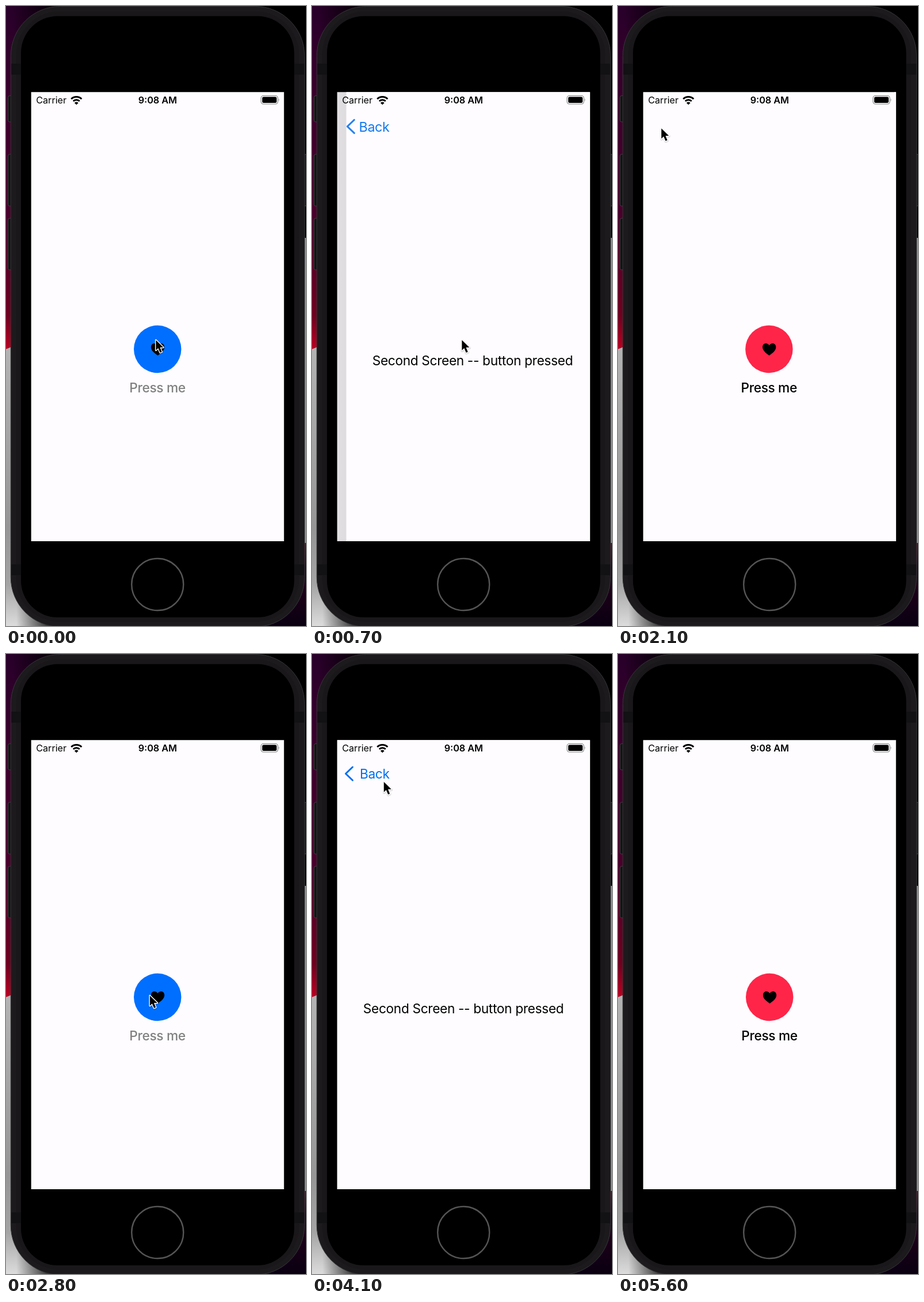
An HTML page that plays this animation: 521x1075 px, repeating every 5700 ms.

```html
<!DOCTYPE html>
<html lang="en">
<head>
<meta charset="utf-8">
<title>Push navigation</title>
<style>
html, body { margin: 0; width: 100%; height: 100%; overflow: hidden; background: #000; }
svg { display: block; width: 100vw; height: 100vh; }
text { font-family: Inter, "Liberation Sans", sans-serif; font-size: 22.7px; letter-spacing: -.34px; }
.status { font-size: 16.2px; letter-spacing: 0; }
</style>
</head>
<body>
<svg viewBox="0 0 521 1075" preserveAspectRatio="none">
  <defs>
    <linearGradient id="wallLeft" x1="0" y1="0" x2="0" y2="1">
      <stop offset="0" stop-color="#28002a"/>
      <stop offset=".3" stop-color="#3c002c"/>
      <stop offset=".65" stop-color="#4c002c"/>
      <stop offset=".9" stop-color="#70001f"/>
      <stop offset="1" stop-color="#c00020"/>
    </linearGradient>
    <linearGradient id="fade">
      <stop offset="0" stop-color="#000" stop-opacity="0"/>
      <stop offset="1" stop-color="#000"/>
    </linearGradient>
    <linearGradient id="grey" x1="0" y1="0" x2="0" y2="1">
      <stop offset="0" stop-color="#b4b4b4"/>
      <stop offset=".65" stop-color="#969696"/>
      <stop offset=".85" stop-color="#a4a4a4"/>
      <stop offset="1" stop-color="#dcdcdc"/>
    </linearGradient>
    <linearGradient id="wallRight" x1="0" y1="0" x2="0" y2="1">
      <stop offset="0" stop-color="#7a0022"/>
      <stop offset=".3" stop-color="#26001c"/>
      <stop offset="1" stop-color="#0a0012"/>
    </linearGradient>
    <linearGradient id="edge">
      <stop offset="0" stop-color="#000" stop-opacity=".005"/>
      <stop offset="1" stop-color="#000" stop-opacity=".022"/>
    </linearGradient>
    <clipPath id="view"><rect x="43.700" y="149.300" width="439" height="778.700"/></clipPath>
  </defs>

  <!-- wallpaper -->
  <rect width="521" height="1075"/>
  <rect width="90" height="598" fill="url(#wallLeft)"/>
  <rect x="10" width="80" height="150" fill="url(#fade)"/>
  <path d="M0 595L12 590H90V1075H0Z" fill="url(#grey)"/>
  <rect x="18" y="960" width="72" height="115" fill="url(#fade)"/>
  <rect x="510" y="402" width="11" height="530" fill="#8e8e8e"/>
  <rect x="430" y="931" width="91" height="144" fill="url(#wallRight)"/>

  <!-- phone -->
  <g fill="#141315" stroke="#414042">
    <rect x="3.500" y="155.500" width="10" height="45.500" rx="3"/>
    <rect x="3.500" y="257" width="10" height="90" rx="3"/>
    <rect x="3.500" y="368" width="10" height="89.500" rx="3"/>
    <rect x="511" y="257" width="11" height="90" rx="3"/>
  </g>
  <rect x="8.300" y=".5" width="510.200" height="1076" rx="86" fill="#1c1a1d" stroke="#363538"/>
  <rect x="17.500" y="9" width="491.500" height="1059" rx="76" fill="#19171a"/>
  <g fill="#121114">
    <rect x="9" y="100" width="17" height="19"/><rect x="500" y="100" width="18" height="19"/>
    <rect x="9" y="968" width="17" height="19"/><rect x="500" y="968" width="18" height="19"/>
  </g>
  <rect x="26" y="17.500" width="474.500" height="1042.500" rx="64"/>
  <circle cx="263.200" cy="1003" r="45" fill="none" stroke="#555" stroke-width="2.400"/>

  <!-- app -->
  <g clip-path="url(#view)">
    <rect x="43" y="149" width="440" height="780" fill="#fefcff"/>
    <g id="first">
      <circle id="disc" cx="263.200" cy="595" r="41.200"/>
      <path d="M263.500 606C257 601.500 251.800 597 251.800 591.500C251.800 587.700 254.400 585 257.700 585C260.200 585 262.300 586.300 263.500 588.500C264.700 586.300 266.800 585 269.300 585C272.600 585 275.200 587.700 275.200 591.500C275.200 597 270 601.500 263.500 606Z"/>
      <text id="label" x="263" y="670" text-anchor="middle" font-weight="500">Press me</text>
    </g>
    <rect id="dim" x="43" y="149" width="440" height="780"/>
    <g id="second">
      <rect id="shade" x="30" y="149" width="14" height="780" fill="url(#edge)"/>
      <rect x="43.700" y="149" width="440" height="780" fill="#fefcff"/>
      <text x="263" y="623" text-anchor="middle">Second Screen -- button pressed</text>
    </g>
    <path id="chevron" d="M70.500 196L58.500 207.500L70.500 219" fill="none" stroke="#0070f0" stroke-width="3" stroke-linecap="round" stroke-linejoin="round"/>
    <text id="back" fill="#0070f0">Back</text>

    <text class="status" x="52.200" y="169">Carrier</text>
    <text class="status" x="263.300" y="169" text-anchor="middle" font-weight="600">9:08 AM</text>
    <g fill="none" stroke="#000" stroke-width="3">
      <path d="M113.300 161.300A12.800 12.800 0 0 1 131.300 161.300"/>
      <path d="M116.800 165A8 8 0 0 1 127.800 165"/>
    </g>
    <path d="M122.300 171.300L118.900 167.900A4.800 4.800 0 0 1 125.700 167.900Z"/>
    <rect x="443" y="155.500" width="29" height="14.500" rx="4" fill="none" stroke="#808080" stroke-width="1.200"/>
    <rect x="445" y="157.500" width="25" height="10.500" rx="2.300"/>
    <path d="M473.600 160.500Q475.500 162.700 473.600 165Z" fill="#888"/>
  </g>

  <g id="cursor" stroke-linejoin="round">
    <path d="M1.300 2.800V20.500L5.300 16.800L8.600 24.500L11.700 23.200L8.500 15.600H14.300Z" stroke="#000" stroke-opacity=".12" stroke-width="4.500" transform="translate(.3 1)" fill="none"/>
    <path d="M1.300 2.800V20.500L5.300 16.800L8.600 24.500L11.700 23.200L8.500 15.600H14.300Z" stroke="#fff" stroke-width="2.800" paint-order="stroke"/>
  </g>
</svg>
<script>
const LOOP = 5700, WIDTH = 439, RATE = 0.013;
const $ = id => document.getElementById(id);
const set = (id, name, value) => $(id).setAttribute(name, value);
const move = (id, x, y, s = 1) => set(id, "transform", `translate(${x} ${y}) scale(${s})`);

// Start time and direction of each screen change
const turns = [[306, 1], [1550, 0], [3196, 1], [4350, 0]];
// Time and tip position of the pointer
const path = [
  [0, 259, 576.5], [950, 259, 576.5], [1380, 74, 209.5], [2150, 74, 209.5],
  [2740, 248.5, 589.5], [3750, 248.5, 589.5], [4100, 123.5, 219],
  [4280, 108, 212], [4420, 108, 212], [4900, 15, 50], [5050, -20, 44]
];

// Critically damped spring that comes to rest after 0.62 s
function spring(ms) {
  if (ms <= 0) return 0;
  if (ms > 620) return 1;
  const x = RATE * ms;
  return 1 - (1 + x) * Math.exp(-x);
}

function shown(t) {
  const turn = turns.filter(([start]) => start <= t).pop();
  if (!turn) return 0;
  const p = spring(t - turn[0]);
  return turn[1] ? p : 1 - p;
}

function pointer(t) {
  const i = path.findIndex(([time]) => time > t);
  if (i < 0) return [-50, 0];
  const [t0, x0, y0] = path[i - 1], [t1, x1, y1] = path[i];
  const k = (t - t0) / (t1 - t0), e = k * k * (3 - 2 * k);
  return [x0 + (x1 - x0) * e, y0 + (y1 - y0) * e];
}

function draw(t) {
  const p = shown(t), rest = 1 - p;
  const pressed = t < 306 || (t >= 2750 && t < 3196);
  set("disc", "fill", pressed ? "#006fff" : "#ff2549");
  set("label", "fill", pressed ? "#808080" : "#000");
  move("first", -0.3 * WIDTH * p, 0);
  move("second", WIDTH * rest, 0);
  set("shade", "opacity", p);
  set("dim", "opacity", 0.115 * p);
  move("back", 82.9 - 39 * rest, 215.5 + 76 * rest, 1 + 0.75 * rest);
  set("back", "opacity", Math.max(0, 1 - 2 * rest));
  move("chevron", 80 * rest, 40 * rest);
  set("chevron", "opacity", Math.max(0, 1 - 4 * rest));
  move("cursor", ...pointer(t));
}

function tick() {
  draw(performance.now() % LOOP);
  requestAnimationFrame(tick);
}
tick();
</script>
</body>
</html>
```
